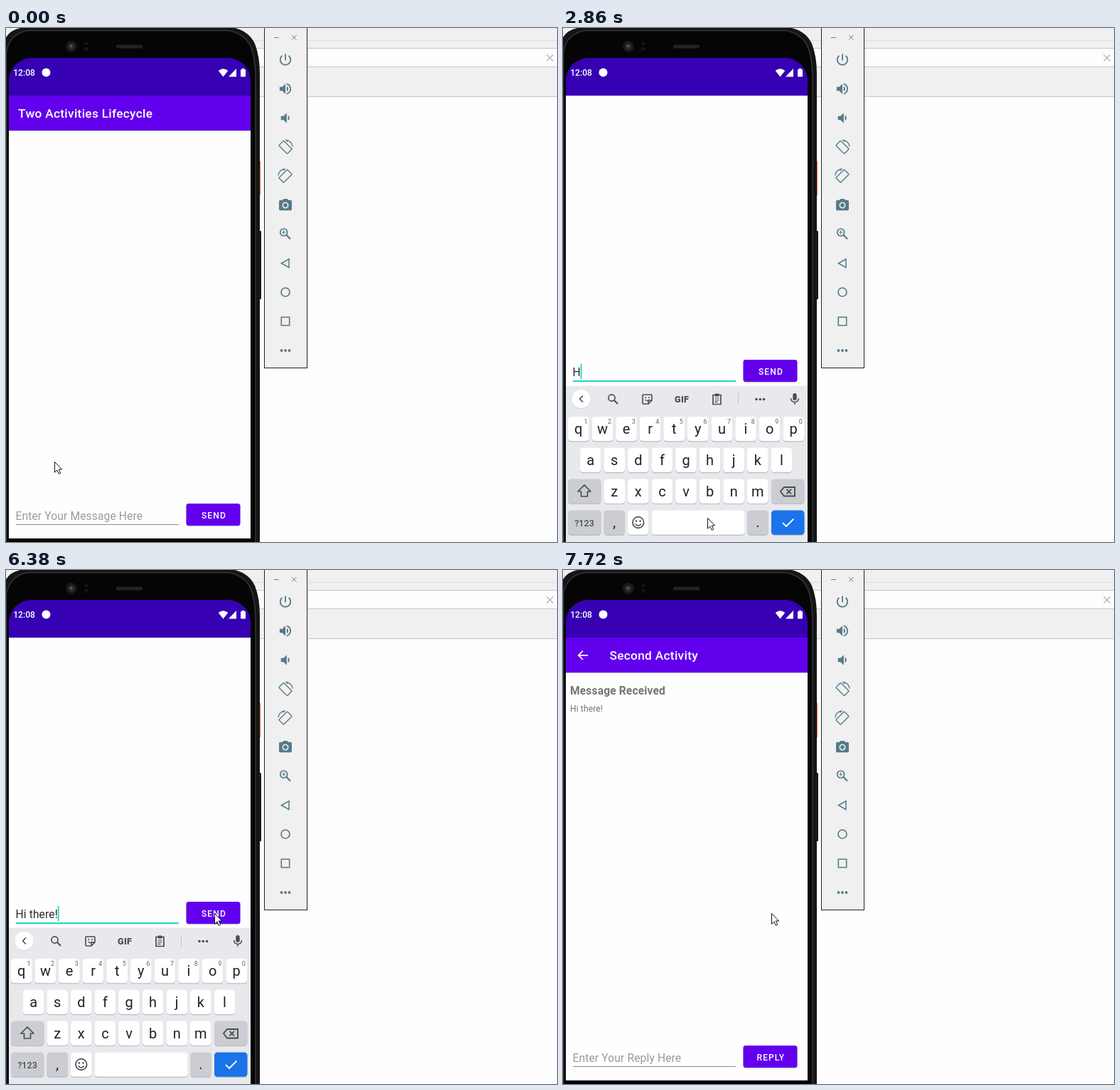
Write an HTML page that moves like this. It is 775 by 722 pixels and loops after 8000 ms.

```html
<!DOCTYPE html>
<html lang="en">
<head>
<meta charset="utf-8">
<title>Two Activities Lifecycle</title>
<style>
  html, body { margin: 0; width: 100%; height: 100%; overflow: hidden; background: #fdfdfd; }
  svg { display: block; font-family: Roboto, "Noto Sans", sans-serif; }
  text { white-space: pre; }
  .mid { text-anchor: middle; }
  .title { font-size: 17.3px; font-weight: 500; letter-spacing: .28px; fill: #fff; }
  .field { font-size: 15.6px; letter-spacing: .13px; }
  .label { font-size: 12.1px; font-weight: 500; letter-spacing: 1.08px; fill: #fff; text-anchor: middle; }
  .key { font-size: 20px; fill: #1f2124; text-anchor: middle; }
  .sup { font-size: 9px; fill: #5f6368; text-anchor: middle; }
  .word { font-size: 15.6px; fill: #5b5e63; text-anchor: middle; }
  .line { fill: none; stroke-width: 1.7; }
</style>
</head>
<body>
<svg id="stage" width="775" height="722" viewBox="0 0 775 722"></svg>
<script>
const LOOP = 8000;
const stage = document.getElementById('stage');
const rect = (x, y, w, h, fill, r = 0, more = '') =>
  `<rect x="${x}" y="${y}" width="${w}" height="${h}" rx="${r}" fill="${fill}" ${more}/>`;
const text = (x, y, cls, s, more = '') => `<text x="${x}" y="${y}" class="${cls}" ${more}>${s}</text>`;
const line = (d, color, width = 1, more = '') =>
  `<path d="${d}" fill="none" stroke="${color}" stroke-width="${width}" ${more}/>`;
const dot = (x, y, r, fill) => `<circle cx="${x}" cy="${y}" r="${r}" fill="${fill}"/>`;
const dots = (x, y, gap, r, fill) => [-gap, 0, gap].map(d => dot(x + d, y, r, fill)).join('');

function desktop() {
  return rect(0, 0, 775, 722, '#fdfdfd') + rect(0, 0, 775, 97, '#f0f0f0')
    + rect(340, 28, 435, 27, '#fdfdfd')
    + line('M340 17.5H775', '#dcdcdc') + line('M340 28.5H775M340 54.5H775M340 96.5H775', '#c6c6c6')
    + line('M760.5 37.5l9 9M769.5 37.5l-9 9', '#a8a8a8', 1.1);
}

function phone() {
  const body = 'M0 13Q6 3 20 0H322Q342 5 350 22Q357 40 357 64V722H0Z';
  return rect(355, 187, 3.2, 48, '#ee8063') + rect(355, 285, 4, 96, '#1d1d1f', 1)
    + `<path d="${body}" fill="#151516"/>`
    + '<path d="M1 722V34Q6 10 30 5H314Q338 10 345 32Q350 48 350 72V722Z" fill="#050505"/>'
    + line('M.5 722V34Q5 8 30 3.5H314Q340 9 346.5 32Q351 48 351 72V722', '#3a3b3c', 1.2)
    + dot(92, 26, 8, '#18181a') + dot(92, 26, 4.5, '#2b2c2f') + dot(91.5, 25.5, 2, '#55575b')
    + rect(110, 20, 6, 4, '#141416', 2) + rect(110, 27, 6, 5, '#141416', 2)
    + rect(155, 23.5, 37, 5, '#222223', 2);
}

function emulatorBar() {
  const c = '#567a89';
  const icon = (y, d, flip = 1) => `<path transform="translate(393 ${y}) scale(${.9 * flip} .9) translate(-12 -12)"
    fill="${c}" fill-rule="evenodd" d="${d}"/>`;
  const rotate = 'M16.48 2.52c3.27 1.55 5.61 4.72 5.97 8.48h1.5C23.44 4.84 18.29 0 12 0l-.66.03 3.81 3.81 1.33-1.32zM10.23 1.75c-.59-.59-1.54-.59-2.12 0L1.75 8.11c-.59.59-.59 1.54 0 2.12l12.02 12.02c.59.59 1.54.59 2.12 0l6.36-6.36c.59-.59.59-1.54 0-2.12L10.23 1.75zm4.6 19.44L2.81 9.17l6.36-6.36 12.02 12.02-6.36 6.36z';
  return rect(363.5, -1, 60, 478.5, '#f0f0f0', 0, 'stroke="#222"')
    + line('M377 13.5H383.5', '#607d8b') + line('M402 10l6.5 6.5M408.5 10l-6.5 6.5', '#607d8b')
    + icon(44.5, 'M13 3h-2v10h2V3zm4.83 2.17l-1.42 1.42C17.99 7.86 19 9.81 19 12c0 3.87-3.13 7-7 7s-7-3.13-7-7c0-2.19 1.01-4.14 2.58-5.42L6.17 5.17C4.23 6.82 3 9.26 3 12c0 4.97 4.03 9 9 9s9-4.03 9-9c0-2.74-1.23-5.18-3.17-6.83z')
    + icon(85.5, 'M3 9v6h4l5 5V4L7 9H3zm13.5 3c0-1.77-1.02-3.29-2.5-4.03v8.05c1.48-.73 2.5-2.25 2.5-4.02zM14 3.23v2.06c2.89.86 5 3.54 5 6.71s-2.11 5.85-5 6.71v2.06c4.01-.91 7-4.49 7-8.77s-2.99-7.86-7-8.77z')
    + icon(126.5, 'M18.5 12c0-1.77-1.02-3.29-2.5-4.03v8.05c1.48-.73 2.5-2.25 2.5-4.02zM5 9v6h4l5 5V4L9 9H5z')
    + icon(167.5, rotate) + icon(208, rotate, -1)
    + icon(249, 'M9 2L7.17 4H4c-1.1 0-2 .9-2 2v12c0 1.1.9 2 2 2h16c1.1 0 2-.9 2-2V6c0-1.1-.9-2-2-2h-3.17L15 2H9zm3 15c-2.76 0-5-2.24-5-5s2.24-5 5-5 5 2.24 5 5-2.24 5-5 5zM12 8.8a3.2 3.2 0 1 0 .01 0z')
    + `<circle cx="390.7" cy="287" r="5" class="line" stroke="${c}"/>`
    + line('M394.5 290.8l5.5 5.7', c, 2.2) + line('M388 287h5.4M390.7 284.3v5.4', c, 1.1)
    + line('M387.5 330.5L398 324.5V336.5Z', c, 1.5)
    + `<circle cx="393" cy="371" r="6" class="line" stroke="${c}"/>`
    + line('M387.3 406.3h11.4v11.4h-11.4z', c, 1.6) + dots(393, 453, 5.5, 1.9, c);
}

function statusIcons() {
  return text(10.2, 67.3, '', '12:08', 'font-size="12.1" font-weight="500" fill="#fff"')
    + dot(56.5, 62.5, 6, '#fff')
    + '<path d="M298.7 60Q305.5 54.5 312.3 60L305.5 68.5ZM313 68.5L324 57V68.5Z" fill="#fff"/>'
    + rect(330, 58, 7, 10.5, '#fff', 1) + rect(332, 56.8, 3, 2, '#fff');
}

const appBar = inner => rect(4, 144, 340, 1, '#000', 0, 'opacity=".2"') + rect(4, 95, 340, 49, '#6200ee') + inner;

const button = (id, label) => `<g id="${id}">`
  + rect(253.5, 669, 76, 31.4, '#000', 4, `opacity=".16" id="${id}Shade"`)
  + rect(253.5, 668, 76, 31, '#6200ee', 3.5, `id="${id}Face"`)
  + text(292.4, 688.6, 'label', label) + '</g>';

const hint = (s, id) => text(13.5, 690.5, 'field', s, `fill="#9a9a9a" id="${id}"`);

function firstScreen() {
  return rect(4, 95, 340, 900, '#fefefe')
    + appBar(text(17, 126.3, 'title', 'Two Activities Lifecycle'))
    + hint('Enter Your Message Here', 'hint')
    + text(13.5, 690.5, 'field', '', 'fill="#2a2a2a" id="typed"')
    + rect(0, 692, 0, 1, '#333', 0, 'id="compose"')
    + rect(14, 697, 229, 1, '#8c8c8c')
    + rect(14, 697, 229, 2, '#1fd6c4', 0, 'id="focus"')
    + rect(14, 674, 1.8, 21, '#1fd6c4', 0, 'id="caret"')
    + button('send', 'SEND');
}

function secondScreen() {
  return rect(4, 42, 340, 53, '#3700b3') + rect(4, 95, 340, 622, '#fefefe')
    + appBar(line('M35 119.8H22.5M28 113.5L21.7 119.8L28 126', '#fff', 1.7) + text(65.5, 126.3, 'title', 'Second Activity'))
    + text(10, 174.5, 'field', 'Message Received', 'font-weight="700" fill="#757575"')
    + text(10, 199, '', 'Hi there!', 'font-size="12.1" letter-spacing=".1" fill="#757575"')
    + hint('Enter Your Reply Here', 'replyHint')
    + rect(14, 697, 229, 1, '#8c8c8c')
    + button('reply', 'REPLY') + rect(4, 717, 340, 5, '#000');
}

function keyboard() {
  const ink = '#4a4d52', grey = '#cbcdd3', step = 33.6;
  const key = (x, y, w, fill) => rect(x, y + 1, w, 34.5, '#b9bbc1', 4.5) + rect(x, y, w, 34.3, fill, 4.5);
  const row = (letters, cx, y) => [...letters].map((ch, i) => {
    const x = cx + i * step;
    return key(x - 14.8, y, 29.6, '#fff') + text(x, y + 24, 'key', ch);
  }).join('');
  const sups = [...'1234567890'].map((n, i) => text(32 + i * step, 556, 'sup', n)).join('');
  const tools = line('M28 516.5L23.5 521L28 525.5', ink, 1.6)
    + `<circle cx="68.5" cy="519.5" r="4.6" class="line" stroke="${ink}"/>` + line('M72 523l5 5', ink, 2)
    + line('M113 515h11q1 0 1 1v7l-5 5h-7q-1 0-1-1v-11q0-1 1-1M120 528v-5h5', ink, 1.6)
    + dot(116.3, 519, 1, ink) + dot(121, 519, 1, ink) + line('M115.5 522q3 3 5.5 0', ink, 1.2)
    + text(167.2, 525.5, 'mid', 'GIF', `font-size="12.5" font-weight="900" letter-spacing=".4" fill="${ink}"`)
    + line('M211 515.5h11v13h-11z', ink, 1.7) + rect(213.5, 513.5, 6, 4, ink, 1)
    + line('M213.5 520h6M213.5 522.7h6M213.5 525.4h4', ink, 1.1)
    + line('M246.5 513V529', '#c4c6ca') + dots(277.3, 521.5, 5.3, 1.8, ink);
  const words = line('M23.5 516.5L28 521L23.5 525.5', ink, 1.6)
    + line('M123.5 512V531M222.5 512V531', '#c4c6ca')
    + [79.5, 172.5, 265.5].map((x, i) => text(x, 527.3, 'word', '', `id="word${i}"`)).join('');
  return rect(4, 502.5, 340, 220, '#e8e9ed')
    + dot(25.5, 521.8, 13.2, '#d4d6da') + dot(25.5, 521, 13, '#fff')
    + `<g id="tools">${tools}</g><g id="words">${words}</g>`
    + rect(323.3, 513, 5.4, 10, ink, 2.7) + line('M320.5 520Q321 525.5 326 525.5Q331 525.5 331.5 520M326 525.5V529', ink, 1.5)
    + row('qwertyuiop', 21.8, 546) + sups + row('asdfghjkl', 38.6, 589.8) + row('zxcvbnm', 72.2, 633.6)
    + key(7, 633.6, 46.5, grey) + line('M30 642L39 651H34.5V658H25.5V651H21Z', ink, 1.7, 'stroke-linejoin="round"')
    + key(293, 633.6, 46.5, grey)
    + line('M311 645H326V657.5H311L306 651ZM314.5 647.8l6.5 6.5M321 647.8l-6.5 6.5', ink, 1.9)
    + key(7, 677.5, 46.5, grey) + text(30, 699.5, 'mid', '?123', `font-size="12.6" font-weight="500" fill="${ink}"`)
    + key(57.5, 677.5, 29.6, grey) + text(72.3, 700.5, 'key', ',')
    + key(91, 677.5, 29.6, '#fff')
    + `<circle cx="105.8" cy="694.5" r="7.8" class="line" stroke="${ink}"/>`
    + dot(103, 692.5, 1.2, ink) + dot(108.6, 692.5, 1.2, ink) + line('M101.8 696.5Q105.8 702 109.8 696.5', ink, 1.4)
    + key(124.7, 677.5, 131, '#fff')
    + key(259.2, 677.5, 29.6, grey) + text(274, 700.5, 'key', '.')
    + key(293, 677.5, 46.5, '#1a73e8') + line('M309 695L314 700L324.5 689.5', '#fff', 1.8);
}

stage.innerHTML = `<defs>
  <clipPath id="glass"><path d="M4 722V74A32 32 0 0 1 36 42H312A32 32 0 0 1 344 74V722Z"/></clipPath>
  <clipPath id="window"><rect x="4" y="95" width="340" height="627"/></clipPath></defs>`
  + desktop() + phone()
  + `<g clip-path="url(#glass)">${rect(4, 42, 340, 680, '#3700b3')}
      <g id="first"><g clip-path="url(#window)"><g id="pan">${firstScreen()}</g></g></g>
      ${rect(4, 717, 340, 5, '#000')}
      <g id="navLight">${rect(4, 719, 340, 3, '#e8e9ed')}</g>
      <g id="keys">${keyboard()}</g>
      <g id="second">${secondScreen()}</g>
      ${statusIcons()}</g>`
  + emulatorBar()
  + '<path id="pointer" d="M.5 .5V15.2L3.9 12L6.3 17.3L8.7 16.2L6.3 11H10.6Z" fill="#fff" stroke="#111" stroke-width="1"/>';

// Each step overrides part of the state from its time on.
const start = {
  pointer: [68, 609], typed: '', from: -1, focus: 0, caret: 0, nav: 0, keys: 0,
  pan: 0, words: null, press: 0, grow: 1, second: 0
};
const steps = [
  [140, { pointer: null }],
  [390, { pointer: [214, 704] }],
  [510, { pointer: [207, 695] }],
  [660, { pointer: [203, 688] }],
  [970, { focus: .6 }],
  [1090, { focus: 1, caret: 1 }],
  [1520, { caret: 0 }],
  [1640, { nav: 1 }],
  [1920, { keys: 1 }],
  [2320, { pan: -176 }],
  [2440, { pan: -202 }],
  [2710, { caret: 1 }],
  [2860, { typed: 'H' }],
  [3110, { from: 0, words: ['H', 'Hi', 'Hey'] }],
  [3260, { typed: 'Hi' }],
  [3510, { typed: 'Hi ', from: -1 }],
  [3630, { words: ['I', 'there', 'how'] }],
  [3780, { typed: 'Hi th', from: 3, words: ['th', 'there', 'this'] }],
  [3900, { typed: 'Hi the' }],
  [4180, { typed: 'Hi ther' }],
  [4300, { words: ['ther', 'there', 'therapy'] }],
  [4860, { typed: 'Hi there' }],
  [5140, { typed: 'Hi there!', words: ['there', 'there’s', 'theres'] }],
  [5420, { from: -1, words: null }],
  [5700, { pointer: [230, 612] }],
  [5850, { pointer: [262, 548], caret: 0 }],
  [5970, { pointer: [283, 502] }],
  [6130, { pointer: [289, 490], caret: 1 }],
  [6260, { pointer: [293, 484] }],
  [6380, { pointer: [293, 482] }],
  [6650, { press: .6 }],
  [6770, { press: 1 }],
  [6920, { press: 0 }],
  [7320, { grow: 1.004 }],
  [7470, { grow: 1.03, keys: 0, nav: 0, second: .97 }],
  [7600, { second: .995 }],
  [7720, { second: 1 }]
];

const el = {};
stage.querySelectorAll('[id]').forEach(node => { el[node.id] = node; });
const show = (id, on) => el[id].setAttribute('visibility', on ? 'inherit' : 'hidden');
const set = (id, attrs) => { for (const k in attrs) el[id].setAttribute(k, attrs[k]); };
const zoom = s => `translate(174 380) scale(${s}) translate(-174 -380)`;
const pen = document.createElement('canvas').getContext('2d');
const width = s => {
  pen.font = '15.6px Roboto, "Noto Sans", sans-serif';
  return pen.measureText(s).width + .13 * s.length;
};

function draw(t) {
  const s = Object.assign({}, start);
  for (const [time, change] of steps) if (t >= time) Object.assign(s, change);

  show('pointer', s.pointer);
  if (s.pointer) set('pointer', { transform: `translate(${s.pointer})` });

  el.typed.textContent = s.typed;
  show('hint', !s.typed);
  const end = width(s.typed);
  show('caret', s.caret);
  set('caret', { x: s.typed ? 13.4 + end : 14 });
  show('compose', s.from >= 0);
  if (s.from >= 0) {
    const left = width(s.typed.slice(0, s.from));
    set('compose', { x: 13.5 + left, width: width(s.typed.replace('!', '')) - left });
  }
  show('focus', s.focus);
  set('focus', { x: 128.5 - 114.5 * s.focus, width: 229 * s.focus });

  set('pan', { transform: `translate(0 ${s.pan})` });
  set('first', { transform: zoom(s.grow) });
  show('navLight', s.nav);
  show('keys', s.keys);
  show('tools', !s.words && s.keys);
  show('words', s.words && s.keys);
  for (let i = 0; i < 3; i++) el['word' + i].textContent = s.words ? s.words[i] : '';

  set('sendFace', { fill: s.press ? (s.press < 1 ? '#772af0' : '#8137f1') : '#6200ee' });
  set('sendShade', { y: 669 + 2 * s.press, opacity: .16 + .12 * s.press });

  show('second', s.second);
  if (s.second) set('second', { transform: zoom(s.second) });
}

const began = performance.now();
function tick() {
  draw((performance.now() - began) % LOOP);
  requestAnimationFrame(tick);
}
tick();
</script>
</body>
</html>
```
